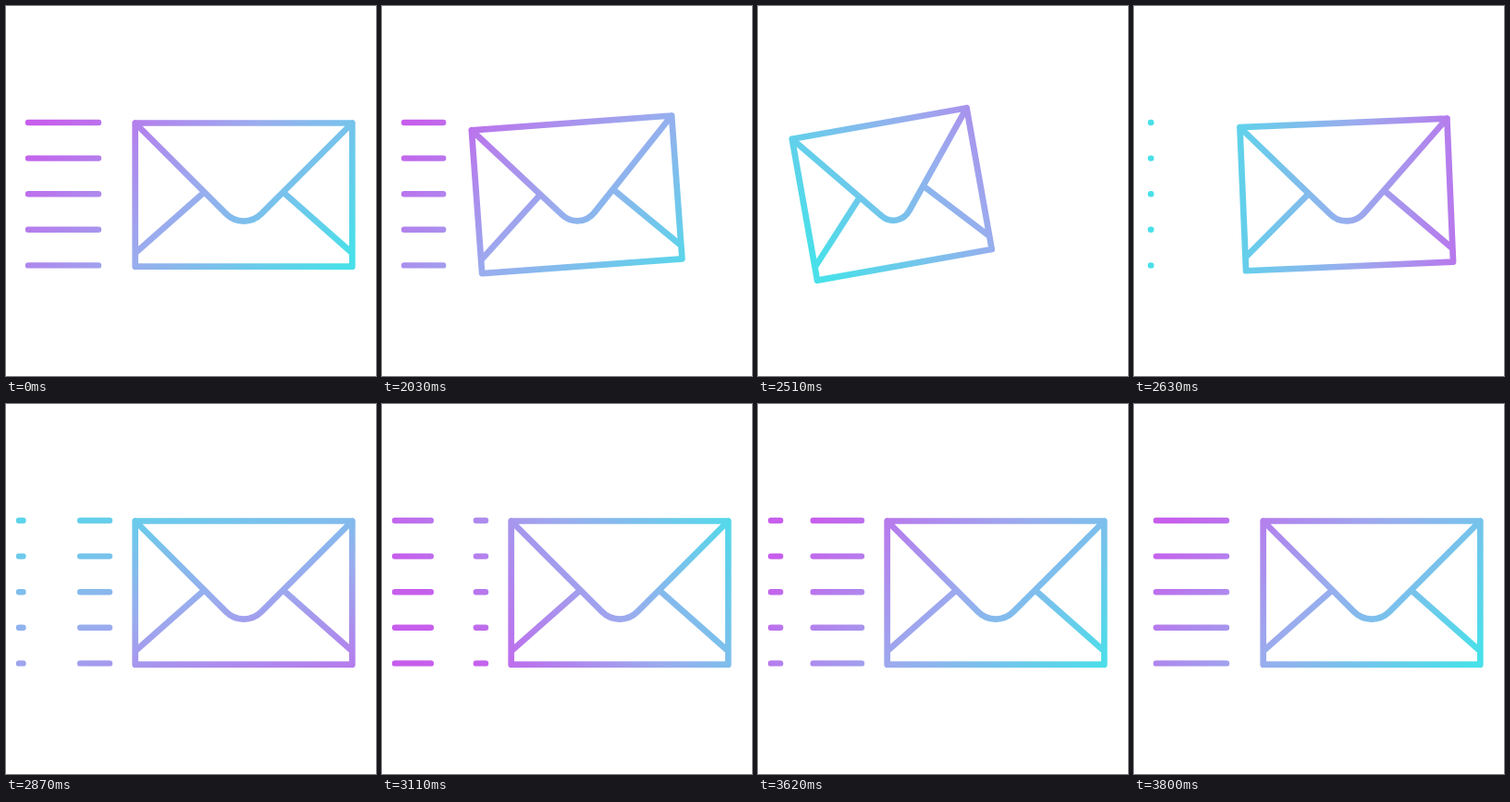
Recreate the animation shown at these times as an HTML page with a canvas. Size 400 by 400 pixels, loop 3.83 s.

```html
<!DOCTYPE html>
<html lang="en">
<head>
<meta charset="utf-8">
<title>Sending mail</title>
<style>
  html, body { margin: 0; width: 100%; height: 100%; overflow: hidden; background: #fff; }
  canvas { display: block; width: 400px; height: 400px; }
</style>
</head>
<body>
<canvas id="stage" width="400" height="400"></canvas>
<script>
const ctx = document.getElementById('stage').getContext('2d');
const HOLD = 2030, STEP = 30, END = 3800, LOOP = END + STEP;
const LINE_LEFT = 14, LINE_SPAN = 98, LINE_REST = 76, LINE_SHORT = 49;

const progress = (t, from, to) => Math.min(1, Math.max(0, (t - from) / (to - from)));

function smooth(t, from, to) {
  const u = progress(t, from, to);
  return u * u * (3 - 2 * u);
}

// S-curve whose late bias slows the start.
function lateEase(u, power = 1.61, bias = 1.9) {
  const a = u ** power, b = bias * (1 - u) ** power;
  return a / (a + b);
}

function gradient(t) {
  const angle = (42 + 360 * smooth(t, 1900, 3620)) * Math.PI / 180;
  const x = 200 + 52 * Math.sin(Math.PI * progress(t, 2270, END));
  const y = 206, r = 172;
  const dx = r * Math.cos(angle), dy = r * Math.sin(angle);
  const g = ctx.createLinearGradient(x - dx, y - dy, x + dx, y + dy);
  g.addColorStop(0, '#c75eec');
  g.addColorStop(.5, '#9aacee');
  g.addColorStop(1, '#49e0e9');
  return g;
}

function envelope(t) {
  const pull = smooth(t, 1840, 2270) - smooth(t, 2520, 2682);
  const w = 117.3, h = 77.6;
  ctx.save();
  ctx.translate(257 - 112.2 * pull, 204.1 - .7 * pull);
  ctx.rotate(-10.1 * pull * Math.PI / 180);
  ctx.scale(1 - .183 * pull, 1);
  ctx.beginPath();
  ctx.rect(-w, -h, 2 * w, 2 * h);
  ctx.moveTo(-w, -h);
  ctx.arcTo(0, w - h, w, -h, 27);
  ctx.lineTo(w, -h);
  for (const side of [-1, 1]) {
    ctx.moveTo(side * 43.5, -2);
    ctx.lineTo(side * 116, 62);
  }
  // Stroke untransformed so the line weight stays even.
  ctx.restore();
  ctx.lineWidth = 6.7;
  ctx.stroke();
}

function speedLines(t) {
  const length = LINE_REST * (1 - smooth(t, 1840, 2250))
    + LINE_SHORT * smooth(t, 2610, 3000)
    + (LINE_REST - LINE_SHORT) * smooth(t, 3440, END);
  if (length <= 0) return;

  // Four full passes to the left, wrapping round the track.
  const passes = 4 * (1 - lateEase(progress(t, 2500, END)));
  const offset = (10 + passes * LINE_SPAN) % LINE_SPAN;
  const end = offset + length;
  const parts = [[offset, Math.min(end, LINE_SPAN)]];
  if (end > LINE_SPAN) parts.push([0, end - LINE_SPAN]);

  ctx.lineWidth = 6.4;
  ctx.beginPath();
  for (let row = 0; row < 5; row++) {
    const y = 126 + 38.6 * row;
    for (const [a, b] of parts) {
      ctx.moveTo(LINE_LEFT + a, y);
      ctx.lineTo(LINE_LEFT + b, y);
    }
  }
  ctx.stroke();
}

function draw(time) {
  // The long hold shows the same pose as the final step.
  const t = time < HOLD ? END : HOLD + Math.floor((time - HOLD) / STEP) * STEP;
  ctx.fillStyle = '#fff';
  ctx.fillRect(0, 0, 400, 400);
  ctx.lineCap = ctx.lineJoin = 'round';
  ctx.strokeStyle = gradient(t);
  speedLines(t);
  envelope(t);
}

const start = performance.now();
function tick() {
  draw((performance.now() - start) % LOOP);
  requestAnimationFrame(tick);
}
tick();
</script>
</body>
</html>
```
